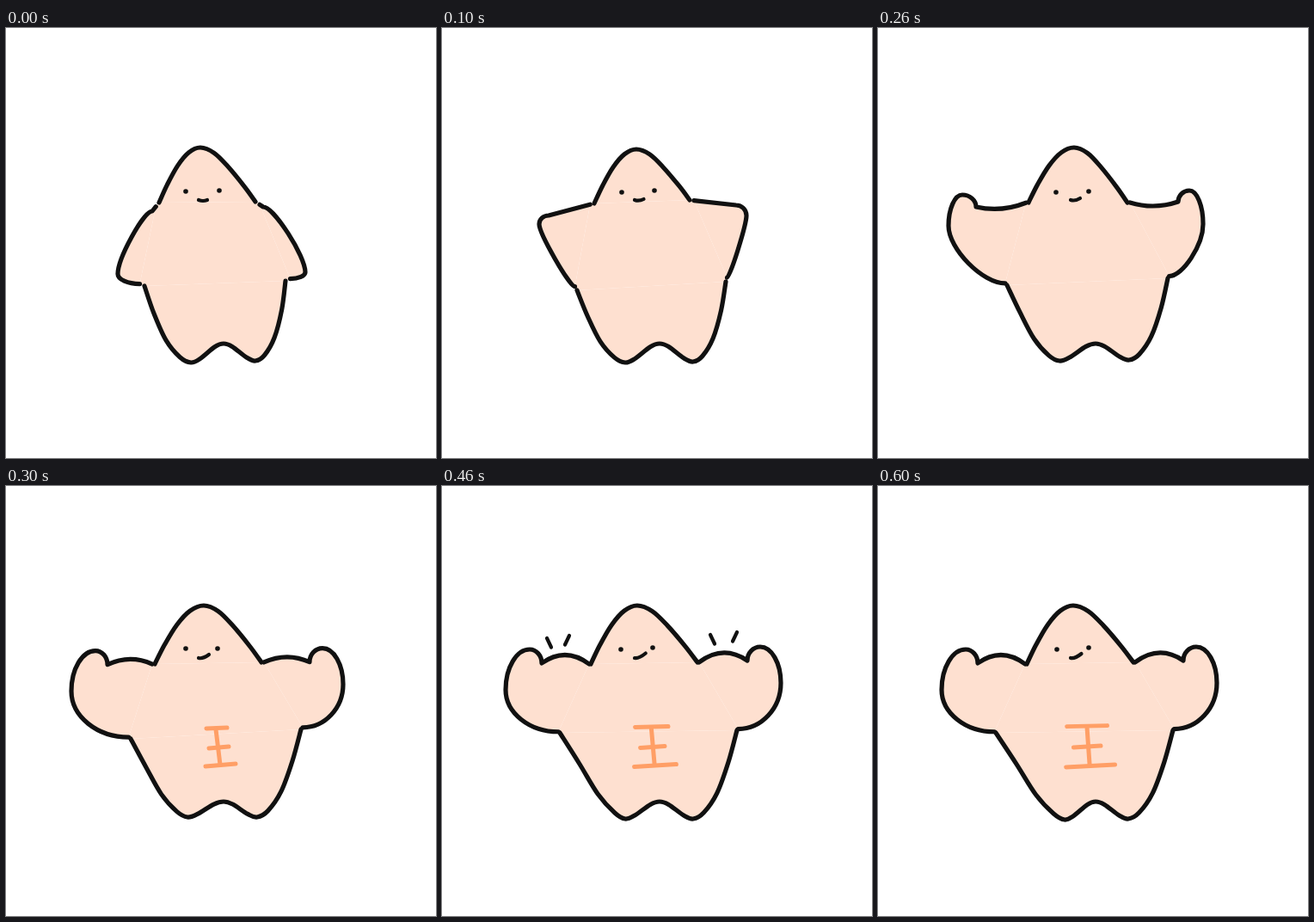
An HTML page with a canvas that plays this animation: 500x500 px, repeating every 700 ms.

```html
<!DOCTYPE html>
<html lang="en">
<head>
<meta charset="utf-8">
<title>Flexing star</title>
<style>
html, body { margin: 0; width: 100%; height: 100%; overflow: hidden; background: #fff; }
canvas { display: block; width: 100vw; height: 100vh; object-fit: contain; }
</style>
</head>
<body>
<canvas id="stage" width="500" height="500"></canvas>
<script>
const ctx = document.getElementById('stage').getContext('2d');
const INK = '#111', SKIN = '#fee0d0', ABS = '#ff9f66';
const STEP = 100;
const ROUND = 0.55; // handle length of an elliptic quarter
const CROTCH = [253, 367];

// An arm is crook, fist, elbow; top and low set how full its outer curves are.
const rest = {
  neck: [[178, 203], [290, 202]], tip: [226, 139],
  hips: [[161, 300], [325, 294]], toes: [[215, 389], [290, 387]],
  arms: [[[170, 213], [170, 213], [130, 286]], [[299, 208], [299, 208], [348, 284]]],
  gap: 6, arc: 0, top: 0.25, low: ROUND, eyes: [[209, 190], [248, 189]], smile: 0
};
const raise = {
  neck: [[177, 204], [288, 200]], tip: [226, 141],
  hips: [[157, 305], [330, 295]], toes: [[213, 389], [292, 388]],
  arms: [[[124, 218], [124, 218], [113, 228]], [[342, 206], [342, 206], [354, 218]]],
  gap: 5, arc: 0, top: ROUND, low: 0.15, eyes: [[209, 191], [247, 189]], smile: 1
};
const curl = {
  neck: [[175, 203], [290, 203]], tip: [228, 139],
  hips: [[150, 299], [337, 291]], toes: [[211, 387], [292, 386]],
  arms: [[[114, 208], [98, 194], [82, 230]], [[349, 202], [362, 189], [378, 228]]],
  gap: 3, arc: -4.5, top: ROUND, low: 0.4, eyes: [[207, 191], [245, 190]], smile: 2
};

// Pumped arms: tension pushes them out and up and swells the biceps.
const flex = (tension, extra) => ({
  neck: [[173, 207], [297, 205]], tip: [227, 139],
  hips: [[137, 287], [343, 284]], toes: [[213, 387], [292, 387]],
  arms: [
    [[116, 206], [102, 190], [74, 237]],
    [[355, 203], [370, 187], [394, 229]]
  ].map((arm, i) => arm.map(([x, y]) => [x + tension * (i ? 1 : -1), y - tension * 0.8])),
  gap: 2, arc: 10 + tension * 2, top: ROUND, low: ROUND,
  eyes: [[208, 190], [245, 188]], smile: 5, ...extra
});

const poses = [
  rest, raise, curl,
  flex(-2, { tip: [230, 139], hips: [[145, 294], [343, 283]], toes: [[211, 385], [292, 385]],
    gap: 3, eyes: [[209, 189], [246, 189]], smile: 4, abs: 0 }),
  flex(0, { abs: 0.6, spark: 1, smile: 5.5 }),
  flex(1, { tip: [228, 138], hips: [[139, 289], [343, 284]], abs: 1, spark: 0.25 }),
  flex(0, { toes: [[217, 388], [291, 387]], abs: 0.95 })
];

// Point at the fractions u, v of the box from a to b.
const at = (a, b, u, v = u) => [a[0] + (b[0] - a[0]) * u, a[1] + (b[1] - a[1]) * v];
const toward = (a, b, dist) => at(a, b, dist / Math.hypot(b[0] - a[0], b[1] - a[1]));

// Catmull-Rom curve through the points.
function smooth(pts) {
  const path = new Path2D();
  path.moveTo(...pts[0]);
  for (let i = 0; i < pts.length - 1; i++) {
    const b = pts[i], c = pts[i + 1];
    const a = pts[i - 1] || b, d = pts[i + 2] || c;
    path.bezierCurveTo(
      b[0] + (c[0] - a[0]) / 6, b[1] + (c[1] - a[1]) / 6,
      c[0] - (d[0] - b[0]) / 6, c[1] - (d[1] - b[1]) / 6, ...c);
  }
  return path;
}

function headPath({ neck: [l, r], tip }) {
  return smooth([
    l, at(tip, l, .8, .67), at(tip, l, .55, .33), at(tip, l, .28, .09), tip,
    at(tip, r, .25, .1), at(tip, r, .5, .35), at(tip, r, .8, .72), r
  ]);
}

// The closer the hip is to the middle, the more the leg bows out.
function leg(hip, toe) {
  const bow = (116 - Math.abs(hip[0] - CROTCH[0])) * 0.004;
  return [
    hip, at(hip, toe, .3 - bow, .36), at(hip, toe, .58 - bow * 1.2, .71),
    at(hip, toe, .84 - bow * .8, .93), toe,
    at(toe, CROTCH, .28, .2), at(toe, CROTCH, .73, .83)
  ];
}

function legsPath({ hips, toes }) {
  return smooth([...leg(hips[0], toes[0]), CROTCH, ...leg(hips[1], toes[1]).reverse()]);
}

// Curve from a to b that bulges toward the given corner.
function bend(path, a, b, corner, k) {
  path.bezierCurveTo(...at(a, corner, k), ...at(b, corner, k), ...b);
}

function armEnds(pose, side) {
  const [crook, , elbow] = pose.arms[side];
  return [toward(pose.neck[side], crook, pose.gap), toward(pose.hips[side], elbow, pose.gap)];
}

function armPath(pose, side) {
  const [crook, fist, elbow] = pose.arms[side];
  const [shoulder, pit] = armEnds(pose, side);
  const [mx, my] = at(shoulder, crook, .5);
  const path = new Path2D();
  path.moveTo(...shoulder);
  path.quadraticCurveTo(mx, my - pose.arc * 2, ...crook);
  bend(path, crook, fist, [crook[0], fist[1]], ROUND);
  bend(path, fist, elbow, [elbow[0], fist[1]], pose.top);
  bend(path, elbow, pit, [elbow[0], pit[1]], pose.low);
  return path;
}

function torsoPath(pose) {
  const [ls, lp] = armEnds(pose, 0), [rs, rp] = armEnds(pose, 1);
  const path = new Path2D();
  [pose.neck[0], pose.neck[1], rs, rp, pose.hips[1], pose.hips[0], lp, ls]
    .forEach(p => path.lineTo(...p));
  return path;
}

function stroke(path, color, width) {
  ctx.strokeStyle = color;
  ctx.lineWidth = width;
  ctx.stroke(path);
}

const dash = (a, b, color, width) => stroke(smooth([a, b]), color, width);

function drawFace({ eyes, smile }) {
  ctx.fillStyle = INK;
  for (const [x, y] of eyes) {
    ctx.beginPath();
    ctx.arc(x, y, 2.8, 0, Math.PI * 2);
    ctx.fill();
  }
  const mouth = new Path2D();
  mouth.moveTo(224, 200);
  mouth.quadraticCurveTo(229, 202 - smile * .2, 234 + smile * .5, 200 - smile);
  stroke(mouth, INK, 4.2);
}

// Three bars and a stem that widen as g goes from 0 to 1.
function drawAbs(g) {
  const bar = (x, y, half, tilt) => dash([x - half, y + tilt], [x + half, y - tilt], ABS, 5);
  bar(245 - 2 * g, 281.5 - 2.5 * g, 12 + 12 * g, .5);
  bar(247.5 - 4.5 * g, 304 - g, 11.5 + 4.5 * g, 1);
  bar(249.5 - 2.5 * g, 324.5 + g, 17.5 + 11.5 * g, 1.5);
  dash([244 - g, 283 - 2 * g], [249 - 3 * g, 324 + g], ABS, 5);
}

function drawSparks(len) {
  for (const [x, y, dir] of [[122, 177, 1], [148, 174, -1], [312, 173, 1], [343, 170, -1]]) {
    dash([x, y], [x + 5 * dir * len, y + 10.5 * len], INK, 4.2);
  }
}

function draw(pose) {
  ctx.fillStyle = '#fff';
  ctx.fillRect(0, 0, 500, 500);
  ctx.lineCap = ctx.lineJoin = 'round';

  const parts = [headPath(pose), armPath(pose, 0), armPath(pose, 1), legsPath(pose)];
  ctx.fillStyle = SKIN;
  [torsoPath(pose), ...parts].forEach(part => ctx.fill(part));
  parts.forEach(part => stroke(part, INK, 5.2));

  drawFace(pose);
  if (pose.abs !== undefined) drawAbs(pose.abs);
  if (pose.spark) drawSparks(pose.spark);
}

const start = performance.now();
function tick() {
  const t = Math.max(0, performance.now() - start);
  draw(poses[Math.floor(t / STEP) % poses.length]);
  requestAnimationFrame(tick);
}
tick();
</script>
</body>
</html>
```
